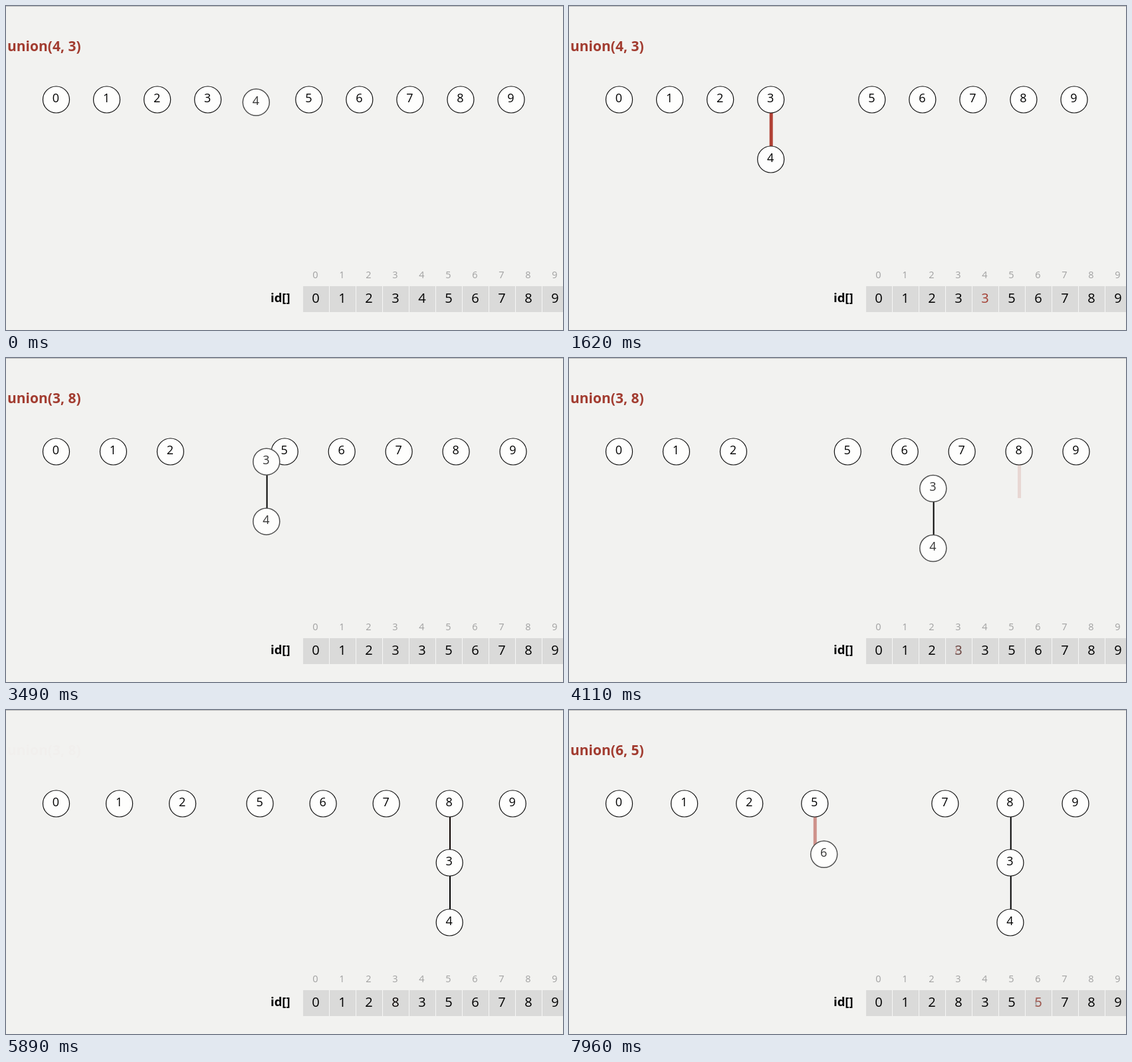
These frames come from a looping animation (838 px wide and 488 px high, 8 s). An HTML page with a canvas:

```html
<!DOCTYPE html>
<html lang="en">
<head>
<meta charset="utf-8">
<title>Quick-union</title>
<style>
html, body { margin: 0; width: 100%; height: 100%; overflow: hidden; background: #f2f2f0; }
canvas { display: block; }
</style>
</head>
<body>
<canvas id="stage" width="838" height="488"></canvas>
<script>
const ctx = document.getElementById('stage').getContext('2d');
const LOOP = 8000, TOP = 141, LEFT = 75.5;
const RED = '#a23c30', BLACK = '#000', FONT = '"Open Sans", "Noto Sans", sans-serif';

const clamp = v => Math.max(0, Math.min(1, v));
const mix = (a, b, p) => a + (b - a) * p;
const ramp = (t, from, to) => clamp((t - from) / (to - from));
const ease = (t, from, to) => 0.5 - 0.5 * Math.cos(Math.PI * ramp(t, from, to));
const slot = (i, count, right) => LEFT + i * (right - LEFT) / (count - 1);

function text(str, x, y, size, color, alpha = 1, weight = 400, align = 'center') {
  ctx.globalAlpha = alpha;
  ctx.font = `${weight} ${size}px ${FONT}`;
  ctx.textAlign = align;
  ctx.fillStyle = color;
  ctx.fillText(str, x, y);
  ctx.globalAlpha = 1;
}

function line(x, y1, y2, width, color, alpha) {
  ctx.globalAlpha = alpha;
  ctx.fillStyle = color;
  ctx.fillRect(x - width / 2, y1, width, y2 - y1);
  ctx.globalAlpha = 1;
}

function node(n, { x, y }, moving) {
  ctx.beginPath();
  ctx.arc(x, y, 20, 0, 2 * Math.PI);
  ctx.fillStyle = '#fefefd';
  ctx.fill();
  ctx.lineWidth = moving ? 1.5 : 1.2;
  ctx.strokeStyle = moving ? '#505050' : '#111';
  ctx.stroke();
  text(n, x - 0.5, y + 3.5, 18, moving ? '#333' : BLACK);
}

function draw(t) {
  // move: child travels under its parent; settle: the remaining roots spread out
  const joins = [
    { child: 4, parent: 3, move: ease(t, -218, 1390), settle: ease(t, 1620, 2262), label: 1 },
    { child: 3, parent: 8, move: ease(t, 2948, 4954), settle: ease(t, 5200, 6235), label: ramp(t, 2580, 2830) },
    { child: 6, parent: 5, move: ease(t, 6800, 8340), settle: 0, label: ramp(t, 6540, 6740) },
  ];
  const [a, b, c] = joins;

  const pos = Array.from({ length: 10 }, (_, n) => {
    const wide = mix(slot(n, 10, 760), slot(n > 4 ? n - 1 : n, 9, 763), a.settle);
    return { x: mix(wide, slot(n > 4 ? n - 2 : n, 8, 762), b.settle), y: TOP };
  });
  const free4 = slot(4, 10, 760);
  const root3 = mix(slot(3, 10, 760), slot(3, 9, 763), a.settle);
  pos[3] = { x: mix(root3, pos[8].x, b.move), y: TOP + 89 * b.move };
  pos[4] = { x: mix(free4, pos[3].x, a.move), y: pos[3].y + 90 * a.move };
  pos[6] = { x: mix(pos[6].x, pos[5].x, c.move), y: TOP + 89 * c.move };

  ctx.fillStyle = '#f2f2f0';
  ctx.fillRect(0, 0, 838, 488);
  ctx.fillStyle = '#bababa';
  ctx.fillRect(0, 0, 838, 1);

  for (const j of joins) {
    const alpha = j.label * (1 - j.settle) ** 3;
    text(`union(${j.child}, ${j.parent})`, 2, 68, 21, RED, alpha, 700, 'left');
  }

  // links lie below the circles
  for (const j of joins) {
    const { x, y } = pos[j.parent];
    line(x + 0.8, y + 20, y + 70, 2, BLACK, clamp(1.5 * j.settle));
    line(x + 0.5, y + 20, y + 70, 5, '#b04034', j.move ** 4 * (1 - j.settle) ** 2);
  }

  const active = joins.find(j => j.move > 0 && j.move < 1);
  const inMotion = n => !!active && (n === active.child || (active === b && n === 4));
  for (const n of [0, 1, 2, 5, 7, 8, 9, 3, 4, 6]) node(n, pos[n], inMotion(n));

  text('id[]', 398, 446, 18.5, BLACK, 1, 700, 'left');
  for (let i = 0; i < 10; i++) {
    const left = 447 + 40 * i, x = left + 19;
    ctx.fillStyle = '#f6f6f5';
    ctx.fillRect(left, 422, 40, 39);
    ctx.fillStyle = '#dadad9';
    ctx.fillRect(left, 422, 39, 39);
    text(i, x - 0.5, 410, 14.5, '#a0a0a0');

    const j = joins.find(k => k.child === i);
    const changed = j ? j.move ** 2 : 0;
    text(i, x, 447, 20, BLACK, 1 - changed);
    if (j) {
      text(j.parent, x, 447, 20, BLACK, clamp(1.5 * j.settle));
      text(j.parent, x, 447, 20, RED, changed * (1 - j.settle) ** 2);
    }
  }
}

function frame() {
  draw(performance.now() % LOOP);
  requestAnimationFrame(frame);
}
frame();
</script>
</body>
</html>
```
